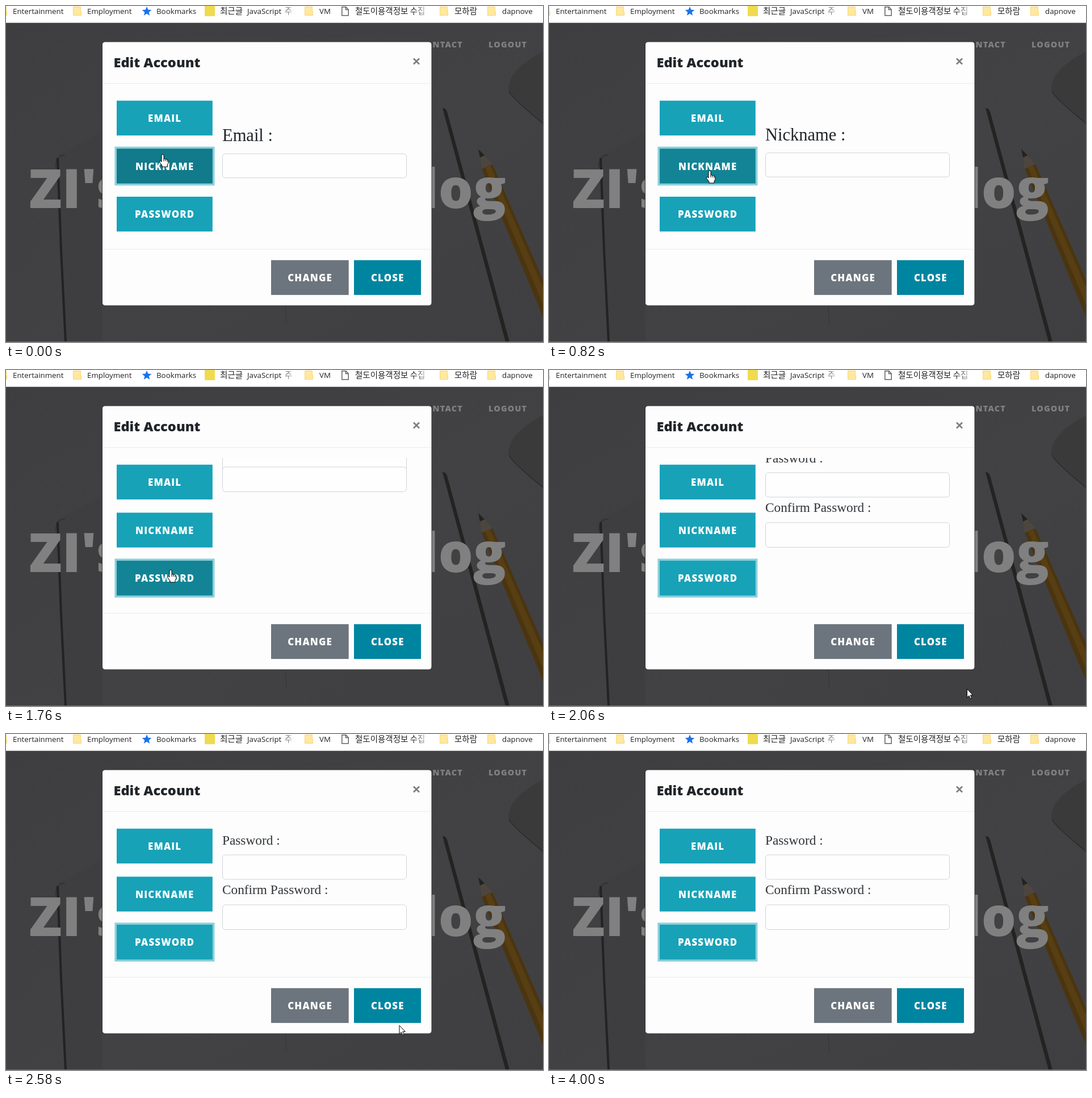
Recreate the animation shown at these times as an HTML page. Size 946 by 592 pixels, loop 4440 ms.

```html
<!DOCTYPE html>
<html lang="en">
<head>
<meta charset="utf-8">
<title>Edit Account</title>
<style>
html, body { margin: 0; width: 100%; height: 100%; overflow: hidden; background: #404042; }
svg { display: block; }
text { font-family: "Open Sans", sans-serif; }
.tab { font-size: 13.3px; fill: #222; }
.kr { font: 14.5px "Noto Sans CJK KR", "Noto Sans CJK", sans-serif; fill: #222; }
.nav { font-size: 14.4px; font-weight: 800; letter-spacing: 1.2px; fill: #808080; }
.hero { font-size: 96px; font-weight: 800; fill: #808080; }
.title { font-size: 23.6px; font-weight: 800; fill: #212529; }
.btn { font-size: 16.8px; font-weight: 800; letter-spacing: 1.2px; fill: #fff; text-anchor: middle; }
.panel text { font-family: "Liberation Serif", serif; font-size: 30.5px; fill: #212529; }
.panel .small { font-size: 23.3px; fill: #303438; }
.panel rect { fill: #fefefe; stroke: #ced4da; }
#hand, #arrow { fill: #fff; stroke: #000; stroke-linejoin: round; }
</style>
</head>
<body>
<svg width="946" height="592" viewBox="0 0 946 592">
  <defs>
    <g id="folder">
      <path d="M0 2q0-1 1-1h12q1 0 1 1v8h1v6q0 1-1 1H1q-1 0-1-1z" fill="#f8d775"/>
      <path d="M1 2h12v9h1v5H1z" fill="#ffe8a0"/>
    </g>
    <linearGradient id="fade"><stop stop-color="#fff" stop-opacity="0"/><stop offset="1" stop-color="#fff"/></linearGradient>
    <linearGradient id="desk" x2="1" y2="1"><stop stop-color="#3e3e40"/><stop offset=".6" stop-color="#424244"/><stop offset="1" stop-color="#3f3f41"/></linearGradient>
    <clipPath id="view"><path d="M378 155h332v243H378z"/></clipPath>
  </defs>

  <!-- desk -->
  <rect width="946" height="592" fill="url(#desk)"/>
  <path d="M946 80Q885 112 885 146Q888 160 946 207z" fill="#3a3a3b"/>
  <path d="M886 150Q892 163 946 207" fill="none" stroke="#2a2a2b" stroke-width="1.5"/>
  <path d="M170 222L100 258Q85 264 87 285L103 592H170z" fill="#3e3e40"/>
  <path d="M104 263Q87 262 88 285" fill="none" stroke="#333334" stroke-width="2"/>
  <path d="M91 268L97 430L105 592" fill="none" stroke="#242223" stroke-width="4"/>
  <path d="M492 528L494 560" stroke="#363638"/>
  <path d="M769 180Q774 179 777 186L887 592H880z" fill="#252222"/>
  <path d="M833 252L857 279L838 287z" fill="#4d463f"/>
  <path d="M832 252L843 263L835 267z" fill="#222"/>
  <path d="M838 287L857 279L946 482V548z" fill="#4b3510"/>
  <path d="M844 284L853 281L946 496V526z" fill="#573e13"/>
  <text class="nav" x="805" y="73" text-anchor="end">CONTACT</text>
  <text class="nav" x="850" y="73">LOGOUT</text>
  <text class="hero" x="40" y="356">ZI's</text>
  <text class="hero" x="881" y="356" text-anchor="end">Blog</text>
  <path d="M0 591.5H946" stroke="#69696a"/>

  <!-- bookmarks bar -->
  <rect width="946" height="29" fill="#fff"/>
  <path d="M0 29.5H946" stroke="#b8b8b8"/>
  <use href="#folder" x="-13"/><use href="#folder" x="118"/><use href="#folder" x="526"/>
  <use href="#folder" x="764"/><use href="#folder" x="848"/>
  <path d="M248 1l2.3 5.6 6 .4-4.6 3.9 1.5 5.9-5.2-3.2-5.2 3.2 1.5-5.9-4.6-3.9 6-.4z" fill="#1a73e8"/>
  <rect x="350" width="18" height="18" fill="#f0db4f"/>
  <path d="M591.8 1.8h7l4.4 4.4v10.6h-11.4zM598.5 2v4.5h4.5" fill="none" stroke="#5f6368" stroke-width="1.5"/>
  <text class="tab" x="12" y="14">Entertainment</text>
  <text class="tab" x="143" y="14">Employment</text>
  <text class="tab" x="265" y="14">Bookmarks</text>
  <text class="kr" x="377" y="14">최근글</text>
  <text class="tab" x="425" y="14">JavaScript</text>
  <text class="kr" x="491" y="14">주</text>
  <text class="tab" x="552" y="14">VM</text>
  <text class="kr" x="615" y="14">철도이용객정보 수집</text>
  <text class="kr" x="790" y="14">모하람</text>
  <text class="tab" x="874" y="14">dapnove</text>
  <rect x="484" width="28" height="27" fill="url(#fade)"/>
  <rect x="716" width="34" height="27" fill="url(#fade)"/>

  <!-- dialog -->
  <rect x="169.5" y="63" width="580.5" height="465" rx="5" fill="#fdfdfd" stroke="#343436"/>
  <path d="M170 136.5H749M170 428.5H749" stroke="#e9ecef"/>
  <text class="title" x="189.5" y="108">Edit Account</text>
  <path d="M718 92.5l10 10m0-10l-10 10" stroke="#7f7f7f" stroke-width="2.8"/>
  <g id="buttons"></g>
  <g clip-path="url(#view)">
    <g class="panel">
      <text x="381" y="240.5">Email :</text>
      <rect x="381.5" y="262.5" width="324" height="42.5" rx="5"/>
    </g>
    <g class="panel">
      <text x="381" y="240.5">Nickname :</text>
      <rect x="381.5" y="262.5" width="324" height="42.5" rx="5"/>
    </g>
    <g class="panel">
      <text class="small" x="381" y="195">Password :</text>
      <rect x="381.5" y="213" width="324" height="43" rx="5"/>
      <text class="small" x="381" y="282">Confirm Password :</text>
      <rect x="381.5" y="301" width="324" height="43.5" rx="5"/>
    </g>
  </g>
  <path id="hand" d="M-2 2a2 2 0 0 1 4 0V8q2-1 3 .7 2-.8 3 .9 2-.4 2 1.9V15l-2 4v3H-1v-2.5L-5.5 13.5q-.8-2.6 1.3-2.3L-2 13zM2 8v4M5 9v3M8 10v3"/>
  <path id="arrow" d="M.5.5V15.5L4 12.3 6.3 17.5 8.6 16.5 6.4 11.4H10.8z"/>
</svg>
<script>
const LOOP = 4440, PANEL_HEIGHT = 243, SLIDE = 1000;
const NICK_CLICK = -18, PASS_CLICK = 1484, PASS_PRESS = 1480;
const INFO = ["#17a2b8", "#138496", "#117a8b"];
const STEPS = [0, 150, 270, 420, 550, 700, 820, 940, 1090, 1210, 1330, 1480, 1630, 1760,
  1910, 2060, 2190, 2330, 2460, 2580, 2730, 2880, 3340, 3490, 3760, 3880, 4000];
// time, x, y of the pointer tip
const POINTER = [[0, 276, 261.5], [700, 278, 268], [820, 283, 290], [940, 286, 319],
  [1090, 288, 345], [1210, 289, 351], [1330, 290, 352], [1910, 560, 524], [2060, 736, 561.5],
  [2330, 730, 550], [2460, 708, 527], [2580, 692.5, 513], [2730, 678, 495], [2880, 675, 491],
  [3340, 678, 491.5], [3490, 680, 494.5], [3760, 745, 540], [3880, 878, 574], [4000, 960, 610]];

const make = (parent, tag, attrs) => {
  const el = document.createElementNS("http://www.w3.org/2000/svg", tag);
  for (const k in attrs) el.setAttribute(k, attrs[k]);
  return parent.appendChild(el);
};
const get = id => document.getElementById(id);

function button(label, x, y, w, colors) {
  const root = get("buttons"), h = 61.3, edge = 3.6;
  const ring = make(root, "rect", { x: x - edge, y: y - edge, width: w + 2 * edge, height: h + 2 * edge, fill: "#8bd0db" });
  const face = make(root, "rect", { x, y, width: w, height: h });
  make(root, "text", { class: "btn", x: x + w / 2 + .3, y: y + 37.2 }).textContent = label;
  return {
    over: (px, py) => px > x && px < x + w && py > y && py < y + h,
    paint(state, focus) {
      face.setAttribute("fill", colors[state]);
      ring.setAttribute("visibility", focus ? "visible" : "hidden");
    }
  };
}
const buttons = [
  button("EMAIL", 195, 166.8, 168.8, INFO),
  button("NICKNAME", 195, 251.4, 168.8, INFO),
  button("PASSWORD", 195, 336, 168.8, INFO),
  button("CHANGE", 467, 447.8, 136.7, ["#6c757d", "#5a6268"]),
  button("CLOSE", 613, 447.8, 118, ["#0085a1", "#00657b"])
];
const panels = document.querySelectorAll(".panel");

// cubic-bezier(.25, .1, .25, 1)
function ease(x) {
  if (x <= 0) return 0;
  if (x >= 1) return 1;
  let lo = 0, hi = 1, s;
  for (let i = 0; i < 24; i++) {
    s = (lo + hi) / 2;
    if (.75 * s * (1 - s) + s ** 3 < x) lo = s; else hi = s;
  }
  return .3 * s * (1 - s) ** 2 + 3 * s * s * (1 - s) + s ** 3;
}

function draw(now) {
  const time = now % LOOP;
  const t = STEPS.findLast(s => s <= time);
  const [, x, y] = POINTER.findLast(p => p[0] <= t);

  const nick = ease((t - NICK_CLICK) / SLIDE), pass = ease((t - PASS_CLICK) / SLIDE);
  [1 - nick, nick - pass, pass].forEach((shown, i) =>
    panels[i].setAttribute("transform", `translate(0 ${(shown - 1) * PANEL_HEIGHT})`));

  const focused = t < PASS_PRESS ? 1 : 2;
  const pressed = t < 150 || t === PASS_PRESS;
  let hovering = false;
  buttons.forEach((b, i) => {
    const over = b.over(x, y);
    hovering ||= over;
    b.paint(over ? (pressed && i === focused ? 2 : 1) : 0, i === focused);
  });

  for (const id of ["hand", "arrow"]) {
    get(id).setAttribute("transform", `translate(${x} ${y})`);
    get(id).setAttribute("visibility", (id === "hand") === hovering ? "visible" : "hidden");
  }
}

const start = performance.now();
function tick() {
  draw(performance.now() - start);
  requestAnimationFrame(tick);
}
tick();
</script>
</body>
</html>
```
